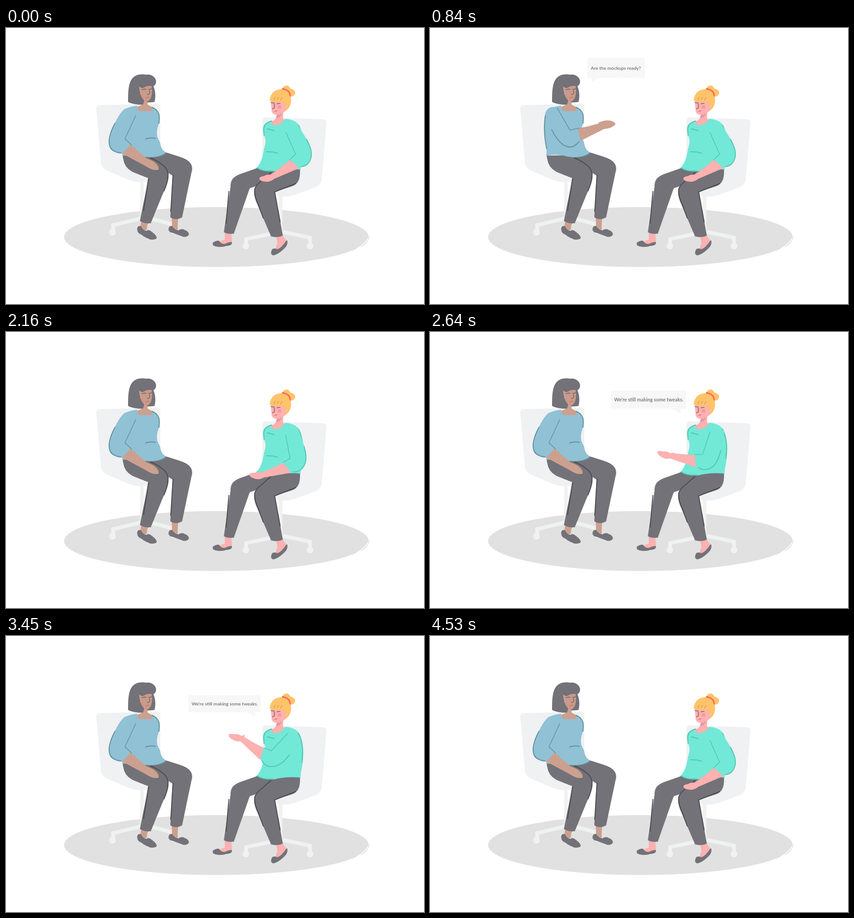
Recreate the animation shown at these times as an HTML page. Size 921 px wide and 608 px high, loop 5.4 s.

```html
<!DOCTYPE html>
<html lang="en">
<head>
<meta charset="utf-8">
<title>Two colleagues talking</title>
<style>
html, body { margin: 0; width: 100%; height: 100%; overflow: hidden; background: #fff }
svg { display: block; width: 100vw; height: 100vh }
.line { fill: none; stroke-width: 2; stroke-linecap: round; stroke-linejoin: round }
.chair { fill: #eff1f2 }
.base { fill: none; stroke: #f0f1f1; stroke-width: 8; stroke-linejoin: round }
.grey { fill: #737278 }
.crease { stroke: #4b4a4e }
.brown { fill: #cca08f }
.blue { fill: #90c1d5 }
.blueline { stroke: #628f9a }
.pink { fill: #fdb1b1 }
.mint { fill: #72e8d7 }
.mintline { stroke: #52c4b4 }
.thin { stroke-width: 1.5 }
.bubble { fill: #f7f7f7 }
text { font: 700 10.3px Lato, sans-serif; fill: #7d7d81; text-anchor: middle }
</style>
</head>
<body>
<svg viewBox="0 0 921 608">
  <ellipse cx="463.500" cy="460.500" rx="335.500" ry="66" fill="#e1e1e1"/>
  <path class="line" stroke="#fff" d="M798 463Q793 475 774 485"/>
  <path class="line thin" stroke="#e1e1e1" d="M800 461Q797 474 781 482"/>

  <!-- chairs -->
  <path class="chair" d="M199 176Q199 170 206 170L333 167Q340 167 340 174V270L412 308V316L300 340Q286 340 272 335L229 317Q211 310 209 297Z"/>
  <path class="base" d="M299.500 335V419L236 434V446M299 415L366 432"/>
  <circle cx="234.500" cy="450" r="7.500" fill="#f0f1f1"/>
  <path class="chair" d="M565 204Q565 197 572 197L699 201Q706 202 706 209L696 332Q695 344 683 350L639 367Q625 372 606 371L491 347V342L565 310Z"/>
  <path class="base" d="M605 366V449L529 465V478M605 448L670 462V478"/>
  <g fill="#f0f1f1"><circle cx="528.500" cy="480" r="7.500"/><circle cx="670" cy="480" r="7.500"/></g>

  <!-- left woman: legs and feet -->
  <path class="brown" d="M365 416L379 420L378 446L366 440ZM298 424L313 428L309 447L296 440Z"/>
  <path class="grey" d="M358 443Q359 435 366 436Q371 444 379 446Q387 441 392 444Q404 449 403 455Q400 461 391 460Q377 455 367 451Q358 450 358 443Z"/>
  <path class="grey" d="M289 443Q289 435 297 436Q301 445 309 447Q315 443 320 448Q333 457 332 463Q328 467 318 466Q305 461 298 455Q289 452 289 443Z"/>
  <path class="grey" d="M340 270L384 284Q412 293 410 312L388 417Q375 425 362 417L367 325L310 290Z"/>
  <path class="grey" d="M257 281C260 300 263 308 281 318L314 331L295 425Q305 432 319 430L351 352C361 332 361 315 347 303L318 280Z"/>
  <path class="line crease" d="M318 286C348 299 359 312 357 326Q356 342 348 359M314 332L303 402M368 324L363 404"/>

  <!-- left woman: head and torso -->
  <path class="grey" d="M269 163C269 130 270 103 299 102Q306 102 308 103C322 100 334 112 330 122Q328 127 325 128C331 143 329 157 327 163Q313 165 305 163L302 169Q280 169 269 163Z"/>
  <path fill="#c89b8b" d="M293 128Q297 133 303 132Q310 126 321 128C323 144 321 156 313 161Q306 163 303 158Q294 148 293 128Z"/>
  <path class="brown" d="M304 160L312 162V169L327 176L321 186H291L288 174L303 168Z"/>
  <path class="line thin" stroke="#6f6669" d="M300 136Q304 134 309 135M315 135L321 134M316 136L317 142Q316 146 312 147"/>
  <path class="line" stroke="#d9705f" d="M308 153.500L314 152.500"/>
  <path class="blue" d="M289 171C270 174 254 178 253 193Q248 230 257 268L256 282Q270 277 290 280C312 287 335 287 353 275C340 266 342 259 338 249C331 236 331 230 336 213C341 194 337 180 322 174Q325 182 318 183Q303 184 292 182Q288 177 289 171Z"/>
  <path class="line blueline" d="M254 194Q249 228 257 266M322 175C339 182 339 194 337 210M307 245Q314 241 329 243M333 284Q344 282 352 276"/>
  <g id="armL">
    <path id="handL" class="brown" d="M308 287Q325 291 333 301Q338 309 336 312Q325 316 307 304Z"/>
    <path class="brown" d="M266 250L276 257Q295 276 314 290L311 306L255 276L250 264Z"/>
    <path class="blue" d="M262 178C249 188 241 207 234 223C224 244 224 263 234 270Q242 276 255 277L276 256L262 244L286 193C284 180 272 174 262 178Z"/>
    <path class="line blueline" d="M240 210C225 238 223 259 235 269Q242 274 253 275"/>
    <path class="line blueline thin" d="M286 193L262 244L277 258"/>
  </g>

  <!-- right woman: legs and feet -->
  <path class="pink" d="M482 448H496L498 471Q490 480 474 477L471 470L482 466ZM594 455H608L618 469L604 488L594 486L598 473Z"/>
  <path class="grey" d="M456 473Q463 467 470 469Q475 478 484 475Q493 470 498 472Q499 479 486 480Q474 484 461 481Q453 478 456 473Z"/>
  <path class="grey" d="M620 468Q622 479 611 488Q599 499 589 501Q581 499 586 488Q590 484 597 487Q605 487 617 469Z"/>
  <path class="grey" d="M555 308L518 321C499 328 495 335 495 348L480 450Q490 455 502 453L537 353L560 345L604 312Z"/>
  <path class="grey" d="M590 310L648 309C648 332 646 341 632 348L592 361L610 457Q600 463 584 459L551 382C543 358 546 350 559 340Z"/>
  <path class="line crease" d="M584 318L560 339C547 349 546 358 550 374L567 419M604 427L592 361L638 343M491 360L485 430"/>

  <!-- right woman: head and torso -->
  <path fill="#ffc36a" d="M608 135Q612 125 621 127Q625 129 626 133Q638 136 637 143Q636 150 627 152L618 145Z"/>
  <path class="pink" d="M583 156H616L622 177Q616 183 611 186L610 198L616 204L610 216L585 214L584 207Q595 204 596 191Q586 192 585 180Z"/>
  <path fill="#e29a9e" d="M597 192Q604 191 610 187Q604 197 595 199Z"/>
  <path fill="#ffc36a" d="M581 160C582 144 593 135 606 135C621 136 629 147 628 161Q628 174 616 183Q619 172 614 164Q599 165 581 160Z"/>
  <path class="line" stroke="#f4695f" style="stroke-width:3" d="M609 134C618 135 626 140 626 149"/>
  <path class="line thin" stroke="#d79e4e" d="M590 158L593 153M598 159L600 153M605 159L608 153"/>
  <circle cx="603" cy="174" r="4" fill="#fa989c"/>
  <path class="line thin" stroke="#776169" d="M584 164.500L591 165M597 167L604 166M591 167L592 174Q591 177 587 178"/>
  <path class="line thin" stroke="#e86a6c" d="M592 183.500L597 182.500"/>
  <path class="mint" d="M587 204C568 207 564 217 567 229C569 239 574 246 571 257C567 268 567 282 562 292Q558 302 552 308Q568 318 590 316Q618 309 649 312L650 300C656 273 657 248 651 227C648 211 636 201 615 200Q610 210 601 213Q589 215 585 212Q583 207 587 204Z"/>
  <path class="line mintline" d="M586 205C568 208 566 221 569 237M576 222L591 226M574 273Q586 271 598 276M553 308Q566 317 588 315M644 214C656 236 654 257 652 278"/>
  <g id="armR">
    <path id="handR" class="pink" d="M592 318L585 323Q575 322 569 326Q560 327 558 331Q559 337 568 338Q580 341 590 333Z"/>
    <path class="pink" d="M640 283L627 289Q608 306 584 322L587 334L643 310L654 300Z"/>
    <path class="mint" d="M640 209C651 225 661 242 669 258C676 273 675 290 665 300Q658 307 645 307L625 290L638 278L617 230C615 215 630 206 640 209Z"/>
    <path class="line mintline" d="M662 245C675 268 677 285 665 299Q659 305 651 305"/>
    <path class="line mintline thin" d="M617 230L638 278L625 290"/>
  </g>

  <!-- speech bubbles, centred on their own origin -->
  <g id="sayL">
    <path class="bubble" d="M-60-22H60Q64-22 64-18V18Q64 22 60 22H-38L-53 32L-54 22H-59Q-63 22-63 18V-18Q-63-22-60-22Z"/>
    <text y="3.700">Are the mockups ready?</text>
  </g>
  <g id="sayR">
    <path class="bubble" d="M-78-19H77Q79-19 79-17V17Q79 19 77 19H67V29L48 19H-78Q-80 19-80 17V-17Q-80-19-78-19Z"/>
    <text y="4">We're still making some tweaks.</text>
  </g>
</svg>
<script>
const LOOP = 5400, STEP = 30;

// Each row is [time in ms, value].
const liftL = [[0, 0], [570, 24], [840, 55], [930, 57], [1140, 42], [1470, 0]];
const liftR = [[1800, 0], [2400, 27], [2640, 42], [2940, 55], [3480, 67], [4110, 44], [4530, 0]];
const popL = [[180, 0], [540, 1.01], [840, 1], [1140, 1], [1470, 0]];
const popR = [[2190, 0], [2370, .6], [2610, 1.045], [2940, 1.01], [3450, 1], [3840, 1], [4110, .57], [4530, .015]];

const slope = (a, b) => (b[1] - a[1]) / (b[0] - a[0]);

// Harmonic mean of the neighbouring slopes: smooth without overshoot.
function tangent(keys, i) {
  if (i === 0 || i === keys.length - 1) return 0;
  const a = slope(keys[i - 1], keys[i]), b = slope(keys[i], keys[i + 1]);
  return a * b > 0 ? 2 * a * b / (a + b) : 0;
}

function valueAt(keys, t) {
  const i = keys.findIndex(k => k[0] > t);
  if (i === 0) return keys[0][1];
  if (i < 0) return keys[keys.length - 1][1];
  const [t0, v0] = keys[i - 1], [t1, v1] = keys[i];
  const d = t1 - t0, u = (t - t0) / d, w = 1 - u;
  return w * w * ((1 + 2 * u) * v0 + u * d * tangent(keys, i - 1))
    + u * u * ((3 - 2 * u) * v1 - w * d * tangent(keys, i));
}

const move = (id, transform) => document.getElementById(id).setAttribute("transform", transform);

function draw(t) {
  const left = valueAt(liftL, t), right = valueAt(liftR, t);
  move("armL", `rotate(${-left} 267 190)`);
  move("armR", `rotate(${right} 630 225)`);
  // The wrist bends back more and more as the arm goes up.
  move("handL", `rotate(${left * left / 170} 313 298)`);
  move("handR", `rotate(${-right * right / 100} 586 328)`);
  move("sayL", `translate(409.500 88) scale(${valueAt(popL, t)})`);
  move("sayR", `translate(482 149) scale(${valueAt(popR, t)})`);
}

const start = performance.now();
function frame() {
  const t = Math.max(0, performance.now() - start) % LOOP;
  draw(Math.floor(t / STEP) * STEP);
  requestAnimationFrame(frame);
}
frame();
</script>
</body>
</html>
```
